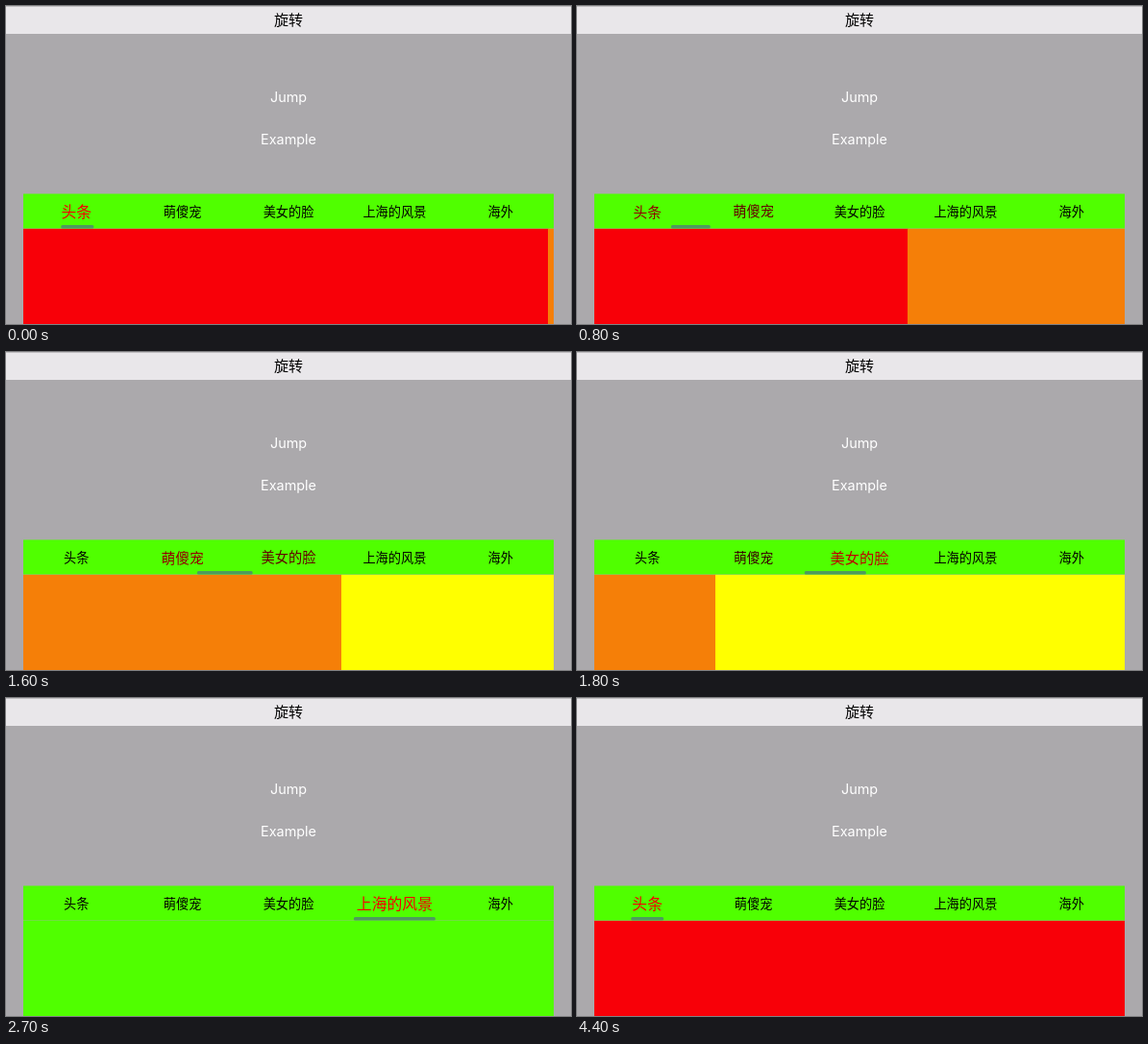
These frames come from a looping animation (588x331 px, 5 s). An HTML page with a canvas:

```html
<!DOCTYPE html>
<html lang="zh-CN">
<head>
<meta charset="utf-8">
<style>
  html, body { margin: 0; width: 588px; height: 331px; overflow: hidden; background: #aba9ac; }
  canvas { display: block; }
</style>
</head>
<body>
<canvas id="stage" width="588" height="331"></canvas>
<script>
const ctx = document.getElementById('stage').getContext('2d');
const LOOP = 5000, STEP = 100;
const LEFT = 18, WIDTH = 552, BAR_TOP = 195.5, BAR_BOTTOM = 231.5;
const TABS = ['头条', '萌傻宠', '美女的脸', '上海的风景', '海外'];
const TAB_WIDTH = WIDTH / TABS.length;
const PAGES = ['#f80008', '#f57f08', '#ffff00', '#50ff00'];
const CJK = '"Noto Sans CJK SC", "Noto Sans CJK", sans-serif';
const JUMP_START = 3200;

// [time in ms, page position] while the pager is swiped by hand
const SWIPE = [
  [0, .01], [300, .06], [600, .179], [800, .409], [1200, .92], [1300, .99],
  [1400, 1.09], [1500, 1.22], [1600, 1.4], [1800, 1.772], [1900, 1.91],
  [2000, 1.99], [2100, 2.08], [2200, 2.21], [2300, 2.4], [2500, 2.79],
  [2600, 2.93], [2700, 3]
];

function swipeAt(t) {
  const i = SWIPE.findIndex(key => key[0] > t);
  if (i < 0) return 3;
  const [t0, p0] = SWIPE[i - 1], [t1, p1] = SWIPE[i];
  return p0 + (p1 - p0) * (t - t0) / (t1 - t0);
}

function smooth(u) {
  u = Math.min(1, Math.max(0, u));
  return u * u * (3 - 2 * u);
}

function rect(color, x, y, w, h) {
  ctx.fillStyle = color;
  ctx.fillRect(x, y, w, h);
}

function label(text, x, baseline, font, color) {
  ctx.font = font;
  ctx.fillStyle = color;
  ctx.fillText(text, x, baseline);
}

function drawHeader() {
  rect('#aba9ac', 0, 0, 588, 331);
  rect('#e9e7ea', 0, 0, 588, 29);
  rect('#c1bfc2', 0, 0, 588, 1);
  label('旋转', 294, 19.6, '500 15px ' + CJK, '#000');
  label('Jump', 294, 99.8, '14.4px Inter, sans-serif', '#fff');
  label('Example', 294, 144, '14.4px Inter, sans-serif', '#fff');
}

function drawPages(position) {
  ctx.save();
  ctx.beginPath();
  ctx.rect(LEFT, BAR_BOTTOM, WIDTH, 100);
  ctx.clip();
  PAGES.forEach((color, i) =>
    rect(color, Math.round(LEFT + (i - position) * WIDTH), BAR_BOTTOM, WIDTH + 1, 100));
  ctx.restore();
}

function drawTabs(position, focus, tint) {
  rect('#50ff00', LEFT, BAR_TOP, WIDTH, BAR_BOTTOM - BAR_TOP);
  const lineWidth = 34 + 17 * position;
  const lineCenter = LEFT + TAB_WIDTH * (position + .5);
  ctx.fillStyle = '#4e9b5e';
  ctx.beginPath();
  ctx.roundRect(lineCenter - lineWidth / 2, 228, lineWidth, 3.4, 1.5);
  ctx.fill();
  TABS.forEach((name, i) => {
    const size = 13.2 * (1 + .2 * focus(i));
    label(name, LEFT + TAB_WIDTH * (i + .5), 214 + .38 * size,
      `${size}px ${CJK}`, `rgb(${Math.round(245 * tint(i))}, 0, 0)`);
  });
}

function draw(t) {
  drawHeader();
  if (t < JUMP_START) {
    const position = swipeAt(t);
    const near = i => Math.max(0, 1 - Math.abs(i - position));
    drawPages(position);
    drawTabs(position, near, near);
  } else {
    // Page and colours switch at once; underline and sizes ease back
    const done = smooth((t - JUMP_START + 100) / 400);
    drawPages(0);
    drawTabs(3 * (1 - done), i => i === 0 ? done : i === 3 ? 1 - done : 0, i => i === 0 ? 1 : 0);
  }
}

ctx.textAlign = 'center';
const start = performance.now();
function tick() {
  const t = (performance.now() - start) % LOOP;
  draw(Math.floor(t / STEP) * STEP);
  requestAnimationFrame(tick);
}
tick();
</script>
</body>
</html>
```
